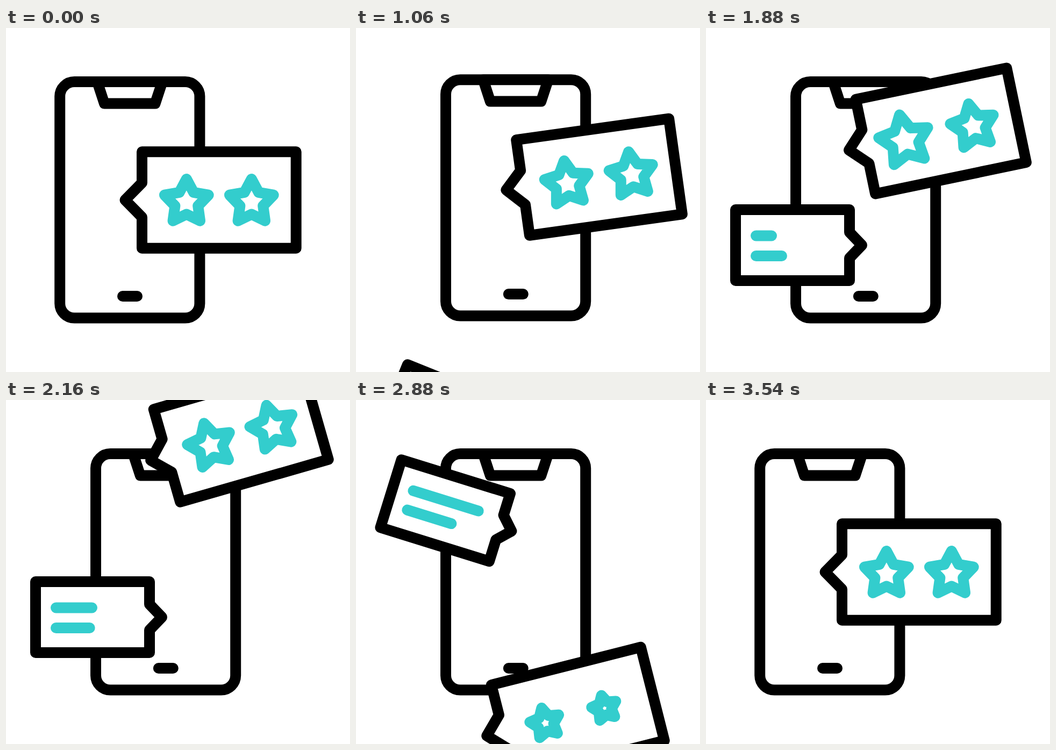
An HTML page that plays this animation: 640 by 640 pixels, repeating every 3.6 s.

```html
<!DOCTYPE html>
<html lang="en">
<head>
<meta charset="utf-8">
<title>Phone reviews</title>
<style>
  html, body { margin: 0; width: 100%; height: 100%; overflow: hidden; background: #fff; }
  svg { display: block; width: 100vw; height: 100vh; }
  path, rect { fill: #fff; stroke: #000; stroke-width: 20; stroke-linecap: round; stroke-linejoin: round; }
  .teal { fill: none; stroke: #33cdcd; }
</style>
</head>
<body>
<svg viewBox="0 0 640 640">
  <g id="phone">
    <rect x="100.2" y="100.1" width="260.2" height="439.4" rx="27"/>
    <path d="M169.8 100.1 183 140.5H277.5L290.8 100.1Z"/>
    <path d="M217 499H244"/>
  </g>
  <g id="note">
    <path d="M55 338H267V380L290 404 267 428V470H55Z"/>
    <path class="teal" id="line1"/>
    <path class="teal" id="line2"/>
  </g>
  <g id="review">
    <path d="M253 230.3H539.7V409.7H253V352L221.5 320 253 288Z"/>
    <path class="teal" id="star0"/>
    <path class="teal" id="star1"/>
  </g>
</svg>
<script>
const LOOP = 3600, STEP = 20;
const REENTRY = 2560; // the review has left at the top and comes back from below
const $ = id => document.getElementById(id);
let t = 0;

// Smooth 0 to 1 between two times.
function ease(start, end) {
  const p = Math.min(1, Math.max(0, (t - start) / (end - start)));
  return p * p * (3 - 2 * p);
}

// Smooth 0 to 1, then back to 0.
const swing = (start, top, leave, end) => ease(start, top) - ease(leave, end);

function place(id, x, y, angle = 0, px = 0, py = 0) {
  $(id).setAttribute('transform', `translate(${x} ${y}) rotate(${angle} ${px} ${py})`);
}

function drawPhone() {
  place('phone', 66.8 * swing(200, 600, 3000, 3420), -30 * swing(960, 1400, 1460, 1860));
}

function drawNote() {
  const y = 400 * (1 - ease(900, 1800)) - 540 * ease(2580, 3400);
  const angle = 22 * (1 - swing(1390, 1800, 2600, 3000));
  const typed = ease(1760, 2660);
  place('note', 0, y, angle, 277, 404);
  $('line1').setAttribute('d', `M93 386.5h${24 + 103 * typed}`);
  $('line2').setAttribute('d', `M93 424h${46 + 40 * typed}`);
}

function drawStar(i) {
  const side = i ? 1 : -1, peak = 1750 - 320 * i;
  const bump = swing(peak - 390, peak, peak, peak + 390);
  const shrunk = t < REENTRY ? 0 : 1 - ease(2500 + 100 * i, 3300 + 100 * i);
  const scale = 1 + 0.19 * bump - 0.6 * shrunk;
  const x = 396.3 + side * (60.5 + 12 * bump) - (5 + 9 * i) * shrunk;
  const points = Array.from({ length: 10 }, (_, k) => {
    const r = (k % 2 ? 22.5 : 43) * scale, a = k * Math.PI / 5;
    return `${x + r * Math.sin(a)} ${324 - r * Math.cos(a)}`;
  });
  $('star' + i).setAttribute('d', `M${points.join('L')}Z`);
}

function drawReview() {
  let x, y, angle;
  if (t < REENTRY) {
    const lift = ease(780, 1420);
    x = 67 * ease(200, 650) - 22.5 * lift + 6 * ease(1900, 2400);
    y = -46 * lift - 47 * Math.max(0, (t - 1640) / 240) ** 1.6;
    angle = -8 * swing(750, 920, 1040, 1390) - 16 * ease(1350, 2150);
  } else {
    const below = 1 - ease(2400, 3420);
    x = 40 * below;
    y = 560 * below;
    angle = -14.2 * (1 - ease(3330, 3540));
  }
  place('review', x, y, angle, 222, 320);
  drawStar(0);
  drawStar(1);
}

function frame() {
  t = Math.floor(performance.now() % LOOP / STEP) * STEP;
  drawPhone();
  drawNote();
  drawReview();
  requestAnimationFrame(frame);
}
frame();
</script>
</body>
</html>
```
